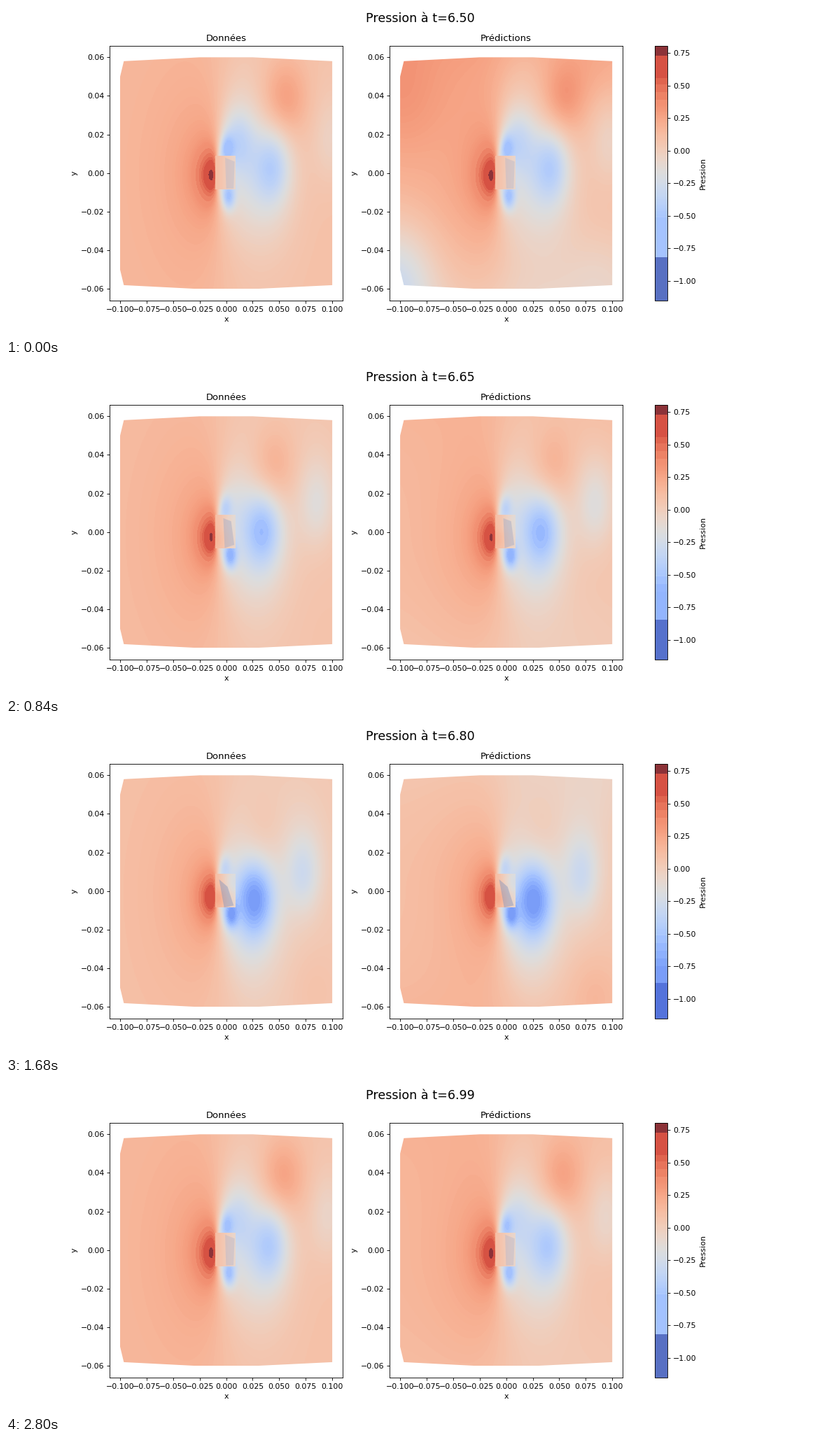
A matplotlib script for the animation above (2940 ms loop, 1183 by 473 pixels).

```python
import numpy as np
import matplotlib.pyplot as plt
from matplotlib.animation import FuncAnimation
from matplotlib.colors import ListedColormap, Normalize, to_rgb
from matplotlib.patches import Polygon

FRAMES, STEP = 21, 140
T0, DT, PERIOD = 6.50, 0.0247, 0.166
VMIN, VMAX = -1.15, 0.806
DPI = 80
K = 1183 / 15 / DPI  # text and line scale

plt.rcParams.update({
    "font.family": "DejaVu Sans", "font.size": 10 * K,
    "axes.titlesize": 12 * K, "axes.titlepad": 6 * K, "axes.labelpad": 4 * K,
    "axes.linewidth": 0.8 * K,
})
for axis in ("xtick", "ytick"):
    plt.rcParams.update({f"{axis}.major.size": 3.5 * K,
                         f"{axis}.major.pad": 3.5 * K,
                         f"{axis}.major.width": 0.8 * K})

X, Y = np.meshgrid(np.linspace(-0.1, 0.1, 304), np.linspace(-0.06, 0.06, 333))


def bump(x, y, sx, sy):
    return np.exp(-0.5 * (((X - x) / sx) ** 2 + ((Y - y) / sy) ** 2))


def ease(a, b, v):
    u = np.clip((v - a) / (b - a), 0, 1)
    return u * u * (3 - 2 * u)


def wave(phase):
    return np.cos(2 * np.pi * phase)


def strength(phase):
    """0 while a vortex lets go, 1 while the next one is at its deepest."""
    return (1 - wave(2 * phase)) / 2


def lobe_side(phase):
    return 1 if (phase + 0.03) % 1 < 0.5 else -1


def vortex(age, side):
    """Low pressure: born behind one corner, drifting off with a weave."""
    x = 0.010 + 0.048 * age + 0.041 * age ** 2
    y = 0.0065 + 0.010 * wave(age)
    amp = 0.25 * np.exp(-((age - 0.22) / 0.14) ** 2)
    amp += 0.29 * ease(-0.2, 0.1, age) * (1 - ease(0.6, 1.25, age))
    core = bump(x, side * y, 0.0115, 0.011 + 0.004 * age)
    halo = bump(x - 0.003, side * (y + 0.012), 0.018, 0.022)
    return amp * (core + 0.36 * halo)


def crest(age, side):
    """High pressure that travels ahead of a young vortex."""
    amp = 0.22 * np.exp(-(age / 0.22) ** 2)
    return amp * bump(0.055 + 0.1 * age, side * (0.038 + 0.05 * age), 0.015, 0.014)


def corner(age, side):
    """Suction at the edge of the obstacle, pulsing once per period."""
    amp = 0.40 - 0.17 * wave(age + 0.2)
    x = 0.001 + 0.003 * wave(age - 0.29)
    return amp * bump(x, 0.0125 * side, 0.0045, 0.005)


def body_pressure(phase):
    side, w = lobe_side(phase), strength(phase)
    tilt = bump(-0.007, 0.004 * side, 0.005, 0.004) - bump(0.006, -0.005 * side, 0.006, 0.005)
    return 0.01 - 0.11 * X / 0.01 + 0.15 * w * tilt


def pressure(phase):
    reach = np.maximum(abs(Y) - 0.008, 0)
    soft = 0.0012 + 0.18 * reach
    front = 1 / (1 + np.exp(np.clip((X + 0.0095 - 0.1 * reach) / soft, -50, 50)))

    stag = 0.0035 * wave(phase - 0.31)
    upstream = 0.60 / (1 + ((X + 0.013) / 0.011) ** 2 + ((Y - stag) / 0.0105) ** 2)
    upstream += 0.05 * bump(-0.03, 0, 0.03, 0.035)

    wake = -0.06 - 0.20 * bump(0.02, 0, 0.024, 0.022) - 0.03 * bump(0.02, 0, 0.03, 0.09)
    for side, age0 in ((1, phase % 1), (-1, (phase + 0.5) % 1)):
        for age in (age0 - 1, age0, age0 + 1):
            wake += crest(age, side) - vortex(age, side)
        wake -= corner(age0, side)

    p = 0.15 - 0.05 * strength(phase) + front * upstream + (1 - front) * wake
    inside = (abs(X + 0.001) < 0.0095) & (abs(Y) < 0.009)
    return np.where(inside, body_pressure(phase), p)


def prediction_error(phase, i):
    sway = wave(phase - 0.1) * (1 - 0.7 * (i / 20) ** 8)
    yn = Y / 0.06
    edges = bump(0.085, 0.052, 0.022, 0.014) - bump(0.085, -0.052, 0.022, 0.014)
    start = 0.13 * bump(-0.1, 0.035, 0.03, 0.025) - 0.36 * bump(-0.105, -0.058, 0.026, 0.022)
    return sway * (0.13 * yn * abs(yn) + 0.08 * edges) + start * np.exp(-i / 1.5)


def palette(phase):
    """Coolwarm with coarse bands toward both ends."""
    w = strength(phase)
    v = np.linspace(VMIN, VMAX, 400)
    step = np.where((v < -0.5) | (v > 0.36), 0.06, 0.01)
    q = np.maximum(np.round(v / step) * step, -0.53 - 0.25 * w)
    q[v > 0.56] = 0.61
    rgb = plt.get_cmap("coolwarm")((q - VMIN) / (VMAX - VMIN))[:, :3]
    rgb[v < -0.82 - 0.06 * w] = mix("#5870c2", "#5473dc", w)
    rgb[v > 0.73] = to_rgb("#8c3238")
    return ListedColormap(rgb)


def mix(a, b, w):
    return (1 - w) * np.array(to_rgb(a)) + w * np.array(to_rgb(b))


def shade_shape(phase):
    """Faint facet in the obstacle: a strip that leans into a wedge."""
    side, w = lobe_side(phase), strength(phase)
    strip = np.array([[0, -8], [7, -8], [8, 6], [-1, 8]]) / 1000
    wedge = np.array([[-7, -6], [1, -2], [7, 7.5], [-2, 8.5]]) / 1000
    return ((1 - w) * strip + w * wedge) * [1, side]


fig, axes = plt.subplots(1, 2, figsize=(1183 / DPI, 473 / DPI), dpi=DPI)
heading = fig.suptitle("", fontsize=16 * K)
norm = Normalize(VMIN, VMAX)
top = np.array([(-0.1, 0.05), (-0.0965, 0.058), (-0.025, 0.06),
                (0.025, 0.06), (0.1, 0.058)])
outline = np.vstack([top, top[::-1] * [1, -1]])

images, shades = [], []
for ax, name in zip(axes, ("Données", "Prédictions")):
    im = ax.imshow(np.zeros_like(X), extent=(-0.1, 0.1, -0.06, 0.06),
                   origin="lower", aspect="auto", norm=norm,
                   cmap="coolwarm", interpolation="nearest")
    im.set_clip_path(Polygon(outline, transform=ax.transData))
    shade = ax.add_patch(Polygon(shade_shape(0), lw=0, alpha=0.45))
    ax.set(title=name, xlabel="x", ylabel="y",
           xlim=(-0.11, 0.11), ylim=(-0.066, 0.066),
           xticks=np.arange(-4, 5) * 0.025, yticks=np.arange(-3, 4) * 0.02)
    images.append(im)
    shades.append(shade)

bar = fig.colorbar(images[0], ax=list(axes), label="Pression",
                   ticks=np.arange(-4, 4) * 0.25)


def draw(i):
    phase = i * DT / PERIOD
    cmap = palette(phase)
    fields = (pressure(phase),
              pressure(phase - 0.012) + prediction_error(phase, i))
    tone = mix("#b9b9cc", "#7f92bd", strength(phase))
    for im, shade, field in zip(images, shades, fields):
        im.set_data(field)
        im.set_cmap(cmap)
        shade.set_xy(shade_shape(phase))
        shade.set_facecolor(tone)
    heading.set_text(f"Pression à t={T0 + i * DT:.2f}")
    return [heading, *images, *shades]


anim = FuncAnimation(fig, draw, frames=FRAMES, interval=STEP,
                     repeat=True, repeat_delay=0, blit=False)
plt.show()
```
